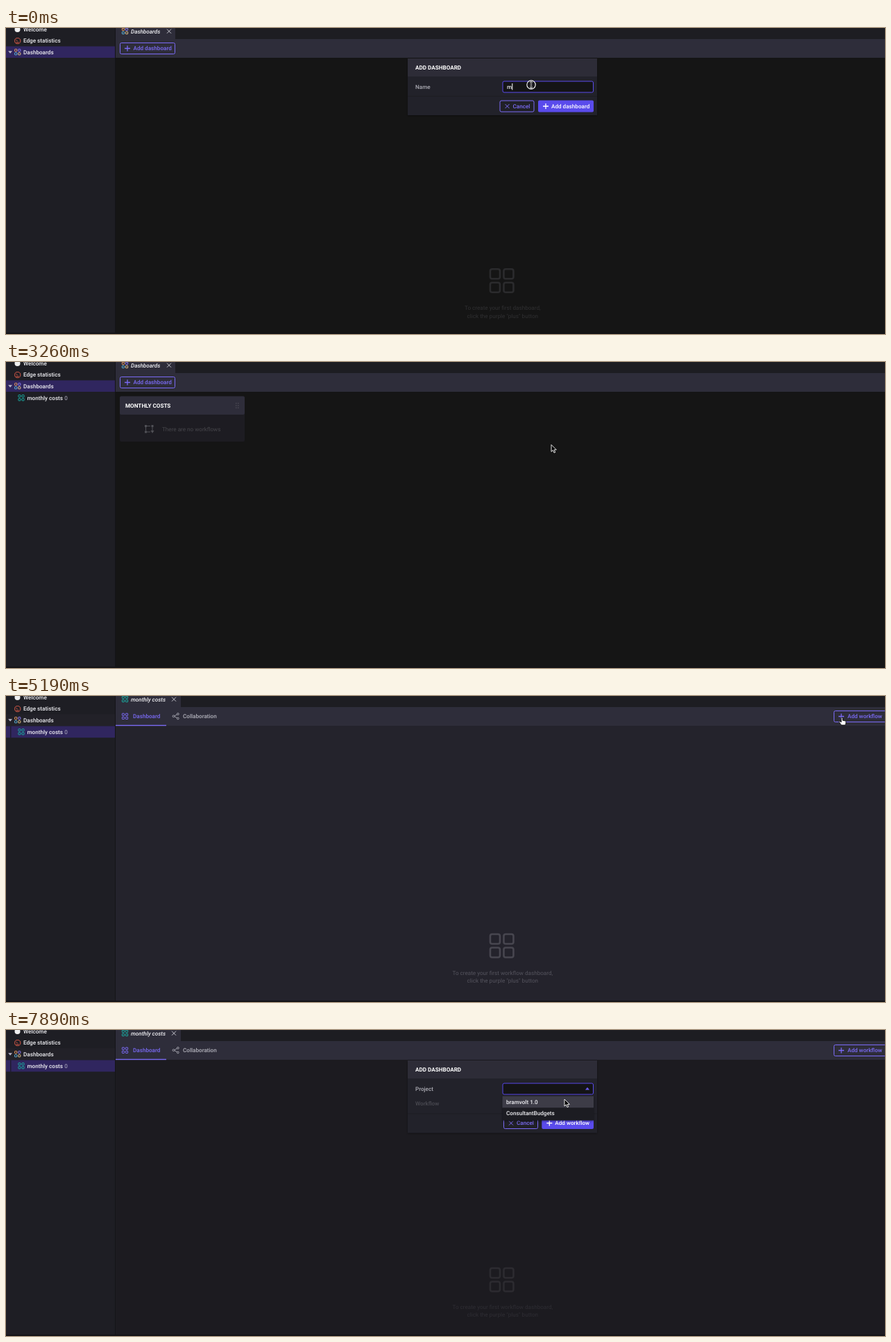
Animation of 1267 by 442 pixels, one loop 8000 ms. Source, as an HTML page:

```html
<!DOCTYPE html>
<html lang="en">
<head>
<meta charset="utf-8">
<title>Dashboards</title>
<style>
  html, body { margin: 0; width: 100%; height: 100%; overflow: hidden; background: #151515; }
  svg { display: block; }
  text { font: 500 8.15px Roboto, sans-serif; white-space: pre; text-rendering: geometricPrecision; }
  .r { font-weight: 400; }
  .b { font-weight: 700; }
  .i { font-style: italic; }
  .m { font-weight: 400; text-anchor: middle; }
</style>
</head>
<body>
<svg id="stage" width="1267" height="442" viewBox="0 0 1267 442"></svg>
<script>
const PURPLE = '#7b6bf6', SOLID = '#5a4bec', BAR = '#2e2d3a', WHITE = '#f0f0f4', TEAL = '#1aa99f';
const LOOP = 8000, LAST = 53;

// Small builders; text is placed by its vertical centre.
const text = (x, y, s, fill = WHITE, cls = '', id = '') =>
  `<text x="${x}" y="${y + 2.9}" fill="${fill}" class="${cls}" id="${id}">${s}</text>`;
const rect = (x, y, w, h, fill, extra = '') =>
  `<rect x="${x}" y="${y}" width="${w}" height="${h}" fill="${fill}" ${extra}/>`;
const line = (d, color, w = 1, extra = '') =>
  `<path d="${d}" fill="none" stroke="${color}" stroke-width="${w}" ${extra}/>`;
const group = (id, ...parts) => `<g id="${id}">${parts.join('')}</g>`;

const cross = (x, y, color) => line(`M${x - 3} ${y - 3}l6 6m0-6l-6 6`, color, 1);
const plus = (x, y, color = 'currentColor') => line(`M${x - 4} ${y}h8m-4-4v8`, color, 1.3);
const frame = (x, y, w, h, color, fill = 'none') =>
  rect(x + .5, y + .5, w - 1, h - 1, fill, `rx="2" stroke="${color}"`);

// Four rounded squares around a centre.
function tiles(cx, cy, size, gap, stroke, colors) {
  const off = (size + gap) / 2;
  return [0, 1, 2, 3].map(k => {
    const x = cx + (k % 2 ? off : -off) - size / 2, y = cy + (k > 1 ? off : -off) - size / 2;
    return rect(x, y, size, size, 'none',
      `rx="${size / 5}" stroke="${colors[k % colors.length]}" stroke-width="${stroke}"`);
  }).join('');
}
const MIXED = ['#e59a62', '#8a7cf4', '#5cb2d8', '#e2c185'];
const icon = (x, y, colors) => tiles(x, y, 3.2, 1.9, 1, colors);

const tab = (w, s, colors) => rect(158, 0, w, 16, BAR) + icon(171.5, 4.5, colors) +
  text(180, 4.7, s, WHITE, 'i') + cross(150 + w - 1 - (w > 90 ? 1 : 0), 4.7, '#c4c4cc').replace('M', 'M');

const hint = (y, a, b, iconColor, color) =>
  tiles(714.7, y, 14, 5.5, 2.6, [iconColor]) +
  text(715.8, y + 39.5, a, color, 'm') + text(715.8, y + 50.6, b, color, 'm');

const outlineButton = (x, y, w, s, color) =>
  `<g color="${color}">${frame(x, y, w, 17, 'currentColor')}${plus(x + 11, y + 8.5)}` +
  text(x + 19.5, y + 8.5, s, 'currentColor') + '</g>';
const cancelButton = (x, y) => frame(x, y, 50, 17, PURPLE, '#202027') +
  cross(x + 11, y + 8.5, PURPLE) + text(x + 19, y + 8.5, 'Cancel', PURPLE);
const solidButton = (x, y, w, s, id) => rect(x, y, w, 17, SOLID, `rx="2" id="${id}"`) +
  plus(x + 11, y + 8.5, '#fff') + text(x + 19, y + 8.5, s, '#fff');

const dialog = h => rect(579, 44, 273, h, '#242429', 'filter="url(#shade)"') +
  rect(579, 44, 273, 26, '#2d2c37') + text(590, 57.2, 'ADD DASHBOARD', '#fff', 'b') +
  rect(579, 44 + h - 28, 273, 1, '#1d1d22');

const sidebar = group('sidebar',
  rect(0, 0, 157, 442, '#1e1e24'),
  rect(0, 26.5, 157, 16.5, '#30265f', 'id="parentRow"'),
  group('child',
    rect(0, 43.5, 157, 16.7, '#30265f', 'id="childRow"'),
    rect(6.3, 43.5, 1, 16.7, '#17171c', 'id="childMark"'),
    icon(22, 51.7, [TEAL]),
    text(30.5, 51.8, 'monthly costs'),
    text(84.3, 51.8, '0', '#b4b2c4', 'r')),
  '<circle cx="16.5" cy="2" r="4" fill="#f0f0f0"/>',
  text(25, 2.2, 'Welcome'),
  '<circle cx="16.7" cy="18.6" r="4.1" fill="none" stroke="#dc5a48"/>',
  line('M14.5 20.8h4.2M16.5 19l-2-2', '#dc5a48'),
  text(25, 18.5, 'Edge statistics'),
  '<path d="M3.2 33.2h5.8l-2.9 3.6z" fill="#b8b6c8"/>',
  icon(16.7, 34.7, MIXED),
  text(25, 34.9, 'Dashboards'),
  rect(157, 0, 1, 442, '#141418'));

const chrome = rect(158, 0, 1109, 16, '#1d1d22') + rect(158, 16, 1109, 27, BAR);

const listView = group('list',
  rect(158, 43, 1109, 399, '#151515'), chrome, tab(86, 'Dashboards', MIXED),
  outlineButton(164, 21, 80, 'Add dashboard', PURPLE),
  group('naming',
    hint(365, 'To create your first dashboard,', 'click the purple "plus" button', '#2b2b2d', '#303032'),
    dialog(82),
    text(590, 84.7, 'Name', '#adadb5'),
    frame(715.5, 76.5, 131.5, 17, SOLID, '#141416'),
    text(722, 84.8, '', WHITE, '', 'typed'),
    rect(0, 80, 1, 9.5, '#fff', 'id="caret"'),
    cancelButton(711.5, 104.5),
    solidButton(767, 104.5, 80, 'Add dashboard', 'addBtn')),
  group('card',
    rect(164, 49.5, 180, 65.5, '#1d1c22', 'rx="2"'),
    rect(164, 49.5, 180, 26.5, BAR, 'rx="2"'),
    text(172, 62.8, 'MONTHLY COSTS', '#fff', 'b'),
    line('M331.8 59v8M334.8 59v8', '#57565f', 1.2, 'stroke-dasharray="1.2 2.1"'),
    line('M203 92.5h5M201.5 94v5M203 101h5M211 94v5', '#505056', 1),
    [[200, 91], [209.5, 91], [200, 99.5]].map(p => rect(p[0], p[1], 3, 3, '#505056')).join(''),
    '<path d="M208.5 99h5l-2.5 4z" fill="#505056"/>',
    text(225, 96.6, 'There are no workflows', '#47474c', 'r')));

const boardView = group('board',
  rect(158, 43, 1109, 399, '#24232c', 'id="boardBg"'), chrome, tab(94, 'monthly costs', [TEAL]),
  icon(171.5, 29.3, [PURPLE]), text(183, 29.5, 'Dashboard', PURPLE),
  rect(158, 41.8, 73, 1.4, PURPLE),
  line('M242 29.2l5.5-3M242 29.2l5.5 3', '#aaaab4', .9),
  [[241.5, 29.2], [247.8, 26], [247.8, 32.4]].map(p =>
    `<circle cx="${p[0]}" cy="${p[1]}" r="1.4" fill="${BAR}" stroke="#aaaab4" stroke-width=".9"/>`).join(''),
  text(255, 29.5, 'Collaboration', '#b2b2bb'),
  group('addFlow', frame(1193, 21, 76, 17, 'currentColor'), plus(1204, 29.5),
    text(1213, 29.5, 'Add workflow', 'currentColor')),
  group('boardHint',
    hint(360.7, 'To create your first workflow dashboard,', 'click the purple "plus" button', '#47464f', '#55545e')),
  group('boardHintDim',
    hint(360.7, 'To create your first workflow dashboard,', 'click the purple "plus" button', '#2c2b30', '#2f2e34')),
  group('picking',
    dialog(104.5),
    text(590, 84.7, 'Project', '#adadb5'),
    text(590, 106.5, 'Workflow', '#4b4b53'),
    rect(715.5, 76.5, 131.5, 17, '#141416', 'rx="2"'),
    group('idleField', text(721, 84.8, 'Project name', '#5c5c65', 'r'),
      '<path d="M835 83h6l-3 3.8z" fill="#8a8a94"/>'),
    frame(715.5, 98, 131.5, 17, '#3c3c46', '#25252c'),
    text(721, 106.5, 'Workflow name', '#5c5c65', 'r'),
    '<path d="M835 105h6l-3 3.8z" fill="#50505a"/>',
    cancelButton(717, 126),
    solidButton(772.3, 126, 74.7, 'Add workflow', 'flowBtn'),
    group('menu',
      frame(715.5, 76.5, 131.5, 17, SOLID),
      '<path d="M835 86.5h6l-3-3.8z" fill="#6c5cf0"/>',
      rect(715.5, 95, 131.5, 35.5, '#1b1b20', 'filter="url(#shade)"'),
      rect(715.5, 95.5, 131.5, 16.7, '#3d3c47', 'id="option"'),
      text(721, 103.9, 'bramvolt 1.0'),
      text(721, 120.3, 'ConsultantBudgets'))));

const pointer = group('pointer',
  '<circle id="ring" r="6.2" fill="#1c1b22" fill-opacity=".75" stroke="#fff" stroke-width="1.1"/>',
  '<path id="arrow" d="M0 0v10l2.4-2.2 1.6 3.8 1.7-.7-1.6-3.6h3.2z" fill="#000" stroke="#fff" stroke-width=".9"/>',
  '<path id="hand" d="M-1 1a1 1 0 0 1 2 0v3.2l3.6.8q1.4.3 1.2 1.8l-.6 3.2q-.3 1-1.2 1h-4.2q-.8 0-1.3-.8l-2.6-3.8q.4-1.2 1.7-.5l1.4 1z" fill="#fff" stroke="#000" stroke-width=".8"/>',
  group('beam', ...[['#fff', 2.2], ['#222', .8]].map(s =>
    line('M-2-4.5q2 0 2 1.5v6q0 1.5-2 1.5M2-4.5q-2 0-2 1.5v6q0 1.5 2 1.5', s[0], s[1]))));

const $ = id => document.getElementById(id);
$('stage').innerHTML =
  '<defs><filter id="shade" x="-10%" y="-20%" width="120%" height="150%">' +
  '<feDropShadow dx="0" dy="1" stdDeviation="1.5" flood-opacity=".45"/></filter></defs>' +
  listView + boardView + sidebar + rect(0, 440, 1267, 2, '#131316') + pointer;

// Pointer stops: tick, x, y.
const stops = [
  [0, 757, 82], [13, 757, 82], [17, 832, 113], [21, 832, 113], [23, 740, 126], [28, 50, 52],
  [29, 48.5, 50.5], [30, 48.5, 50.5], [35, 1205, 31], [36, 1205, 31], [40, 1217, 30],
  [41, 1217, 30], [43, 800, 148], [44, 762, 150], [45, 755, 138], [49, 805, 85],
  [50, 805, 86], [53, 805, 100]
];
const shapes = [[0, 'beam'], [1, ''], [13, 'beam'], [15, 'arrow'], [16, 'hand'], [20, 'arrow'],
  [35, 'hand'], [41, 'arrow'], [45, 'hand'], [46, 'arrow'], [48, 'hand'], [52, 'arrow']];
const clicks = [0, 19, 29, 40, 49];
const typedCount = [1, 2, 3, 4, 6, 7, 8, 10, 11, 12, 13];

// Ticks last 150 ms, except a few that come 10 ms early.
const early = [5, 9, 13, 20, 25, 34];
const startOf = n => n * 150 - 10 * early.filter(e => e <= n).length;

function tickAt(ms) {
  let n = LAST;
  while (startOf(n) > ms) n--;
  return n;
}

function pointerAt(n) {
  const k = stops.findIndex(s => s[0] >= n);
  if (stops[k][0] === n) return stops[k].slice(1);
  const [n0, x0, y0] = stops[k - 1], [n1, x1, y1] = stops[k];
  const u = (n - n0) / (n1 - n0), e = u * u * (3 - 2 * u);
  return [x0 + (x1 - x0) * e, y0 + (y1 - y0) * e];
}

const show = (id, on) => { $(id).style.display = on ? '' : 'none'; };
const paint = (id, color) => $(id).setAttribute('fill', color);

function draw(n) {
  const board = n >= 30, modal = n >= 41, menu = n >= 50;
  show('list', !board);
  show('naming', n < 20);
  show('card', n >= 20);
  show('child', n >= 20);
  show('board', board);
  show('boardHint', !modal);
  show('boardHintDim', modal);
  show('picking', modal);
  show('idleField', !menu);
  show('menu', menu);
  show('option', n >= 52);

  $('typed').textContent = 'monthly costs'.slice(0, typedCount[Math.min(n, 10)]);
  show('caret', n < 11);
  if (n < 11) $('caret').setAttribute('x', 722.2 + $('typed').getComputedTextLength());
  paint('addBtn', n >= 16 ? '#7d70f5' : SOLID);
  paint('parentRow', board ? '#222128' : '#30265f');
  const hover = n >= 27 && n < 30;
  paint('childRow', hover ? '#3d3c47' : n === 30 ? '#5140cf' : board ? '#30265f' : 'none');
  show('childMark', n >= 27);
  paint('boardBg', modal ? '#1c1b20' : '#24232c');
  $('addFlow').style.color = n >= 37 && n < 41 ? '#4a3cc6' : PURPLE;

  const shape = shapes.filter(s => s[0] <= n).pop()[1];
  for (const id of ['arrow', 'hand', 'beam']) show(id, id === shape);
  show('ring', clicks.includes(n));
  $('pointer').setAttribute('transform', `translate(${pointerAt(n)})`);
}

let drawn = -1;
function loop() {
  const n = tickAt(performance.now() % LOOP);
  if (n !== drawn) draw(drawn = n);
  requestAnimationFrame(loop);
}
loop();
</script>
</body>
</html>
```
